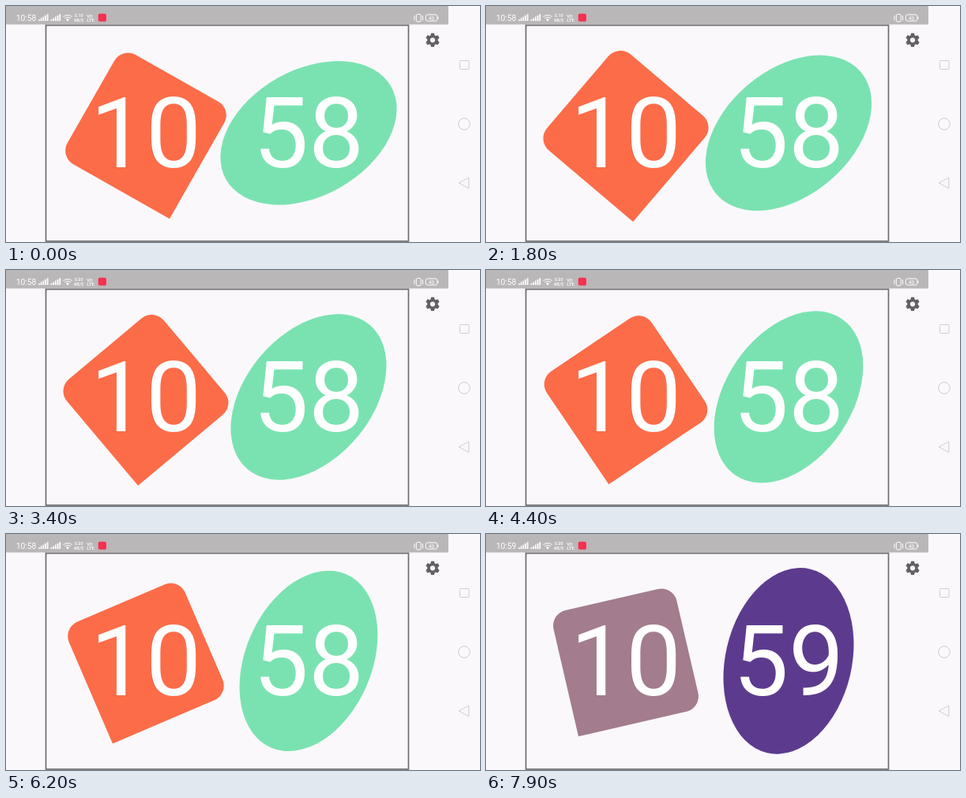
Recreate the animation shown at these times as an HTML page. Size 600x300 px, loop 8 s.

```html
<!DOCTYPE html>
<html lang="en">
<head>
<meta charset="utf-8">
<title>Turning clock</title>
<style>
  html, body { margin: 0; width: 100%; height: 100%; overflow: hidden; background: #faf8fb; }
  svg { display: block; width: 600px; height: 300px; font-family: Roboto, Arial, sans-serif; }
  .big { font-size: 125px; fill: #fff; text-anchor: middle; }
  .bar { fill: #fff; }
  .tiny { font-size: 5.4px; font-weight: 500; text-anchor: middle; }
  .line { fill: none; stroke: #fff; stroke-width: 1; }
  .nav { fill: none; stroke: #cfcdd1; stroke-width: 1; stroke-linejoin: round; }
</style>
</head>
<body>
<svg viewBox="0 0 600 300">
  <rect width="600" height="300" fill="#faf8fb"/>
  <rect width="560" height="23.5" fill="#bab7b9"/>

  <g class="bar">
    <text id="time" x="12.7" y="19" font-size="10.3"></text>
    <g id="signal"></g>
    <g transform="translate(78 19)">
      <path class="line" stroke-width="1.2" d="M-5.6-5.2a8 8 0 0 1 11.2 0M-3.8-3.1a5.4 5.4 0 0 1 7.6 0"/>
      <path d="M0 .4l-2-2.2a2.9 2.9 0 0 1 4 0z"/>
    </g>
    <g class="tiny">
      <text id="speed" x="92.3" y="14.4"></text>
      <text x="92.3" y="19.6">KB/S</text>
      <text x="106" y="14.6" font-size="5.8">VO</text>
      <text x="107" y="19.8" font-size="5.8">LTE</text>
    </g>
    <rect x="116.8" y="9.8" width="10.2" height="10" rx="2" fill="#f6304e"/>
    <rect class="line" x="519.3" y="10.5" width="5.8" height="9.4" rx="1.2"/>
    <path class="line" d="M516.9 12.3v5.8M527.5 12.3v5.8"/>
    <rect class="line" x="531.3" y="11" width="14.6" height="8.2" rx="2.2"/>
    <path class="line" d="M547 13.6v3"/>
    <text x="538.6" y="17.6" font-size="6.8" text-anchor="middle">40</text>
  </g>

  <rect x="50.5" y="24.5" width="459" height="274.5" fill="none" stroke="#6e6d70" stroke-width="1.7"/>

  <g id="gear" transform="translate(540 43.3)" fill="#5f5f64"></g>

  <g class="nav">
    <rect x="574.5" y="69.5" width="11.5" height="11" rx="1"/>
    <circle cx="580" cy="150" r="7.3"/>
    <path d="M573.3 225L585.8 218.2V231.8Z"/>
  </g>

  <!-- rounded square with one sharp corner, bottom left -->
  <path id="square" d="M-80 80V-60a20 20 0 0 1 20-20H60a20 20 0 0 1 20 20V60a20 20 0 0 1-20 20Z"/>
  <ellipse id="oval" rx="80" ry="120"/>
  <text class="big" x="177" y="205">10</text>
  <text id="minute" class="big" x="383" y="205"></text>
</svg>

<script>
const LOOP = 8000, STEP = 100;
const START_ANGLE = 60.4, DEG_PER_MS = 360 / 60000;

const minutes = [
  { from: 0, minute: "58", square: "#fc6c48", oval: "#7ae2b1" },
  { from: 7700, minute: "59", square: "#a37c8e", oval: "#5c3b8e" }
];
const speeds = [
  { from: 0, text: "0.10" },
  { from: 3200, text: "0.03" },
  { from: 7300, text: "0.00" }
];

const el = id => document.getElementById(id);
const at = (table, t) => table.filter(row => row.from <= t).pop();

function setText(id, text) {
  if (el(id).textContent !== text) el(id).textContent = text;
}

function place(id, x, angle, fill) {
  el(id).setAttribute("transform", `translate(${x} 161.4) rotate(${angle})`);
  el(id).setAttribute("fill", fill);
}

function buildSignal() {
  let bars = "";
  for (const x of [41, 56.6])
    for (let i = 0; i < 5; i++) {
      const h = 2 + i * 1.7;
      bars += `<rect x="${x + i * 2.7}" y="${19 - h}" width="1.7" height="${h}"/>`;
    }
  el("signal").innerHTML = bars;
}

function buildGear() {
  let parts = '<circle r="6.4"/>';
  for (let a = 0; a < 360; a += 60)
    parts += `<path transform="rotate(${a})" d="M-2.9-5L-2-8.4Q-1.9-8.8-1.5-8.8H1.5Q1.9-8.8 2-8.4L2.9-5Z"/>`;
  el("gear").innerHTML = parts + '<circle r="3.1" fill="#faf8fb"/>';
}

function draw(t) {
  const now = at(minutes, t);
  const angle = START_ANGLE - t * DEG_PER_MS;
  place("square", 177, -angle, now.square);
  place("oval", 383, angle, now.oval);
  setText("minute", now.minute);
  setText("time", "10:" + now.minute);
  setText("speed", at(speeds, t).text);
}

function tick() {
  const t = performance.now() % LOOP;
  draw(Math.floor(t / STEP) * STEP);
  requestAnimationFrame(tick);
}

buildSignal();
buildGear();
tick();
</script>
</body>
</html>
```
